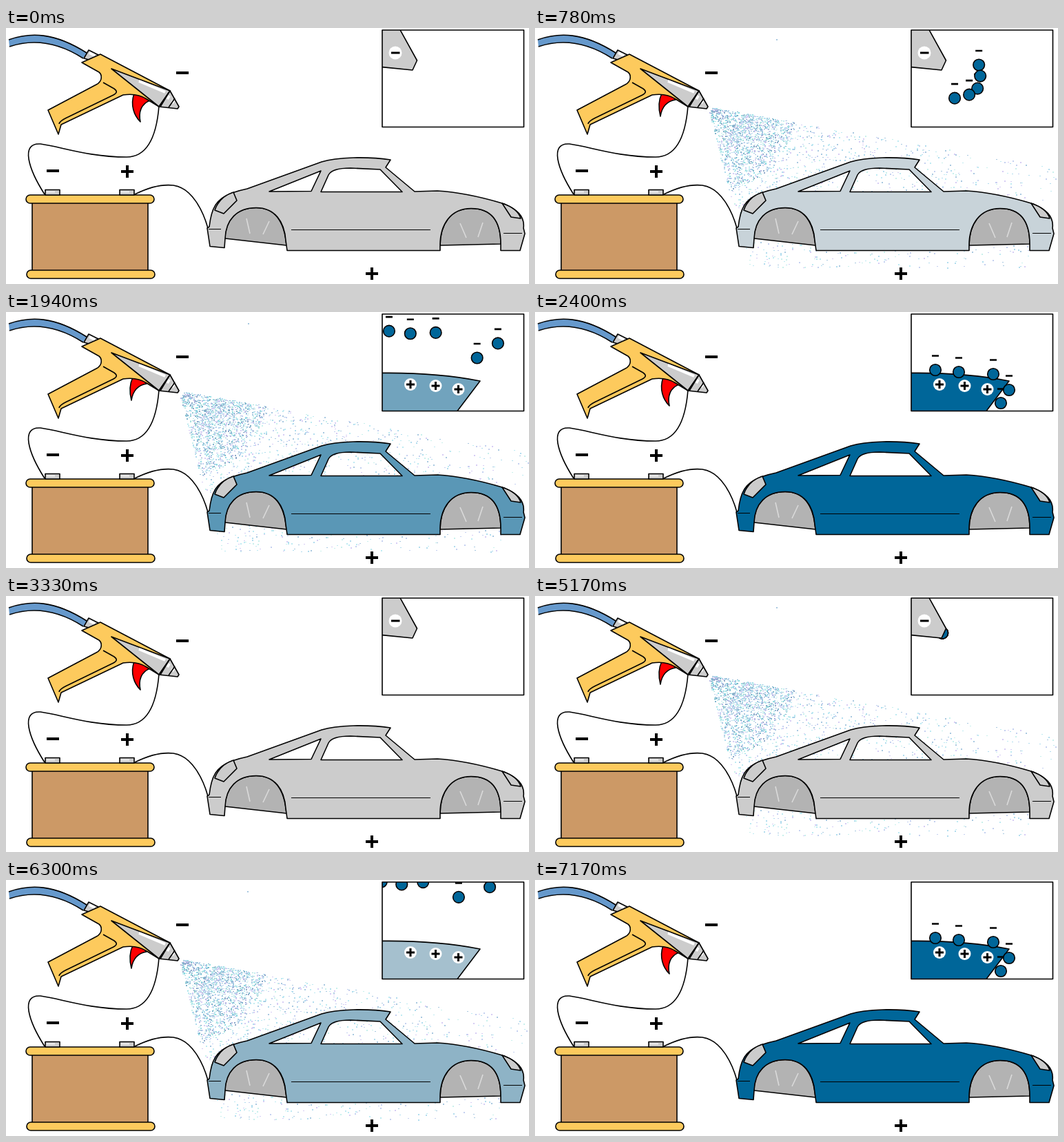
An HTML page with a canvas that plays this animation: 759 by 371 pixels, repeating every 8000 ms.

```html
<!DOCTYPE html>
<html lang="en">
<head>
<meta charset="utf-8">
<title>Electrostatic painting</title>
<style>
  html, body { margin: 0; width: 759px; height: 371px; overflow: hidden; background: #fff; }
  canvas, svg { position: absolute; left: 0; top: 0; }
  svg { stroke: #000; stroke-width: 1.6; stroke-linejoin: round; fill: none; }
  .gray { fill: #ccc; }
  .yellow { fill: #fdca5d; }
  .shine { stroke: #fff; stroke-width: 4; }
  .sign { stroke-width: 4; }
  .small { stroke-width: 3; }
  .spoke { stroke: #dadada; }
  .dot { fill: #fff; stroke: none; }
  .charge { stroke-width: 2.6; }
</style>
</head>
<body>
<canvas id="spray" width="759" height="371"></canvas>
<svg width="759" height="371" viewBox="0 0 759 371">
  <defs>
    <clipPath id="frame"><rect x="546" y="3" width="205.500" height="140.500"/></clipPath>
  </defs>

  <!-- wires -->
  <path d="M222 113C219 150 208 187 175 187C120 187 80 172 50 168C20 166 33 205 56 241"/>
  <path d="M187 241C205 232 225 226 243 228C270 232 286 265 293 290"/>

  <!-- spray gun -->
  <path d="M4 17C35 6 70 6 117 36L112 44C70 17 35 17 5 27Z" fill="#69c" stroke="none"/>
  <path d="M4 17C35 6 70 6 117 36M5 27C35 17 70 17 112 44"/>
  <path class="gray" d="M120 32L134 39L128 48L113 44Z"/>
  <path class="shine" d="M121 36L129 40"/>
  <path id="trigger" fill="#f00"/>
  <path class="yellow" d="M137 38L238 91L222 114L204 103C195 97 183 95 170 97L80 140L76 154L61 119L131 82C141 77 139 67 135 64L110 50Z"/>
  <path d="M141 79L157 88Q164 93 156 97L86 131Q78 135 77 139"/>
  <path class="gray" d="M153 59L238 91L222 114Z"/>
  <path class="shine" d="M193 77L231 93"/>
  <path class="gray" d="M238 91L251 114L249 117L222 114Z"/>
  <path class="shine" d="M237 98L234 103M243 105L241 109"/>
  <path d="M238 91L224 114M245 102L236 115"/>
  <path class="sign" d="M247 65h18"/>

  <!-- battery -->
  <rect x="38" y="253" width="168" height="99" fill="#c96"/>
  <rect class="yellow" x="29" y="242" width="186" height="12" rx="6"/>
  <rect class="yellow" x="30" y="351" width="186" height="12" rx="6"/>
  <rect class="gray" x="57" y="234.500" width="21" height="7.500"/>
  <rect class="gray" x="165" y="234.500" width="21" height="7.500"/>
  <path d="M59 237.500h12M167 237.500h12" stroke="#eee" stroke-width="2"/>
  <path class="sign" d="M59 207h18M167 208h18M176 199v18M522 356h18M531 347v18"/>

  <!-- car -->
  <path d="M318 305C318 278 335 260.500 363 260.500C390 260.500 404 280 407 315Z" fill="#b3b3b3"/>
  <path d="M630 315C630 285 645 261.500 675 261.500C705 261.500 718 280 718 313Z" fill="#b3b3b3"/>
  <path class="spoke" d="M349 276l5 22M382 280l-9 19M659 283l9 21M692 282l-7 21"/>
  <path id="car" fill-rule="evenodd" d="M292 290L295 288C298 262 304 248 328 239Q340 235 350 233L458 194C480 187 525 186 558 191L551 202L593 237L626 236C660 238 690 245 720 254C745 263 753 276 751 290L753 298L746 322.500H718V313C718 280 705 261.500 675 261.500C645 261.500 630 285 630 315V322.500H408L406 308C404 280 390 260.500 363 260.500C335 260.500 319 278 318 305L317 318.500L296 316.500Z
    M382 237L457 207L443 236.500ZM457 237.500L468 213Q473 203 500 203L543 205L575 237.500Z"/>
  <path class="gray" d="M330 238L335 250L316 269L303 264C307 252 315 243 330 238Z"/>
  <path class="gray" d="M720 254C735 259 744 266 747 276L733 274Z"/>
  <path d="M414 292.500H616M294 291.500H312M722 297.500H749" stroke-width="1.200"/>

  <!-- close-up -->
  <rect x="546" y="3" width="205.500" height="140.500" fill="#fff" stroke="none"/>
  <g clip-path="url(#frame)">
    <g id="panel">
      <path id="panelFill" d="M540 88.500C600 87.500 650 92.500 688 100L655 143.500V150H540Z"/>
    </g>
    <g id="drops"></g>
    <g id="nozzle">
      <path class="gray" d="M540 0H570.500L596.500 47L590 61L540 56Z"/>
      <circle class="dot" cx="565" cy="36" r="9.500"/>
      <path class="small" d="M559 36h12.500"/>
    </g>
  </g>
  <rect x="546" y="3" width="205.500" height="140.500"/>
</svg>
<script>
const LOOP = 8000, SWITCH = 810, STEP = 40;
const RUNS = [{ from: 500, to: 2400, hold: 3330 }, { from: 5170, to: 7170, hold: 8000 }];
const TIP = [591, 53.5];
const FAN = [[53, 0], [55, 16], [51, 34], [39, 43], [18, 48]];
// cubic paths onto the panel: straight on top, curling round the edge
const LAND = [
  line([541, -6], [581, 84]),
  line([570, -2], [615, 87]),
  line([599, -6], [665, 90]),
  [[648, 11], [678, 59], [728, 118], [676, 132]],
  [[697, 2], [715, 26], [733, 105], [688, 113]]
];
const TRIGGER = {
  rest: 'M186 95C180 112 186 127 195 136C192 122 196 110 209 105L200 97Z',
  pulled: 'M184 95C178 107 180 120 182 128C184 114 192 106 204 104L196 96Z'
};
const INNER = ['#7fb4cc', '#9fc4dc', '#8fdce4', '#b8b8e4', '#a8e0dc', '#b4d4ee', '#8ca8c8', '#c4ecf0'];
const OUTER = ['#bdeaf2', '#d6ccf4', '#b0dcee', '#a8c8e0', '#c8f0ec', '#c4d0f0'];
const METAL = [204, 204, 204], TINT = [204, 213, 218], BLUE = [0, 102, 153];

const $ = id => document.getElementById(id);
const ctx = $('spray').getContext('2d');

function line(a, b) {
  const at = k => a.map((v, i) => v + (b[i] - v) * k);
  return [a, at(1 / 3), at(2 / 3), b];
}

function bezier(p, k) {
  const j = 1 - k;
  return [0, 1].map(i =>
    j * j * j * p[0][i] + 3 * j * j * k * p[1][i] + 3 * j * k * k * p[2][i] + k * k * k * p[3][i]);
}

function add(parent, tag, attrs) {
  const el = document.createElementNS('http://www.w3.org/2000/svg', tag);
  for (const name in attrs) el.setAttribute(name, attrs[name]);
  return parent.appendChild(el);
}

function random(seed) {
  return () => {
    seed = (seed * 1664525 + 1013904223) >>> 0;
    return seed / 4294967296;
  };
}

for (const [x, y] of [[587, 105], [623.5, 107], [656.5, 112]]) {
  add($('panel'), 'circle', { class: 'dot', cx: x, cy: y, r: 9 });
  add($('panel'), 'path', { class: 'small', d: `M${x - 6} ${y}h12M${x} ${y - 6}v12` });
}

// all minus signs lie below all droplets
const signs = FAN.map(() => add($('drops'), 'path', { class: 'charge', d: 'M-5 -20.5h10' }));
const balls = FAN.map(() => add($('drops'), 'circle', { r: 8.3, fill: '#069' }));

function mist(rnd, count, near, span, power, colors, shift) {
  for (let i = 0; i < count; i++) {
    const r = near + span * rnd() ** power + shift;
    const a = (10 + 66 * rnd() ** 1.1) * Math.PI / 180;
    const x = 251 + r * Math.cos(a), y = 114 + r * Math.sin(a);
    ctx.fillStyle = colors[Math.floor(rnd() * colors.length)];
    const h = rnd() < 0.5 ? 1 : 2;
    if (y < 347) ctx.fillRect(Math.round(x), Math.round(y), 2, h);
  }
}

let shown;
function drawSpray(phase) {
  if (phase === shown) return;
  shown = phase;
  ctx.clearRect(0, 0, 759, 371);
  if (phase < 0) return;
  const rnd = random(7);
  mist(rnd, 1000, 6, 120, 0.8, INNER, phase * 1.6);
  mist(rnd, 2300, 50, 465, 1.25, OUTER, phase * 1.6);
  ctx.fillRect(350 + phase, 16, 2, 2);
}

function paint(base, k) {
  return `rgb(${base.map((v, i) => Math.round(v + (BLUE[i] - v) * k))})`;
}

function render(t) {
  const run = RUNS.find(r => t >= r.from && t < r.hold);
  const u = run ? Math.min(t, run.to) - run.from : 0;
  const length = run ? run.to - run.from : 1;
  const spraying = !!run && t < run.to;
  const close = u >= SWITCH;
  const base = u < STEP ? METAL : TINT;

  drawSpray(spraying ? Math.floor(u / STEP) % 7 : -1);
  $('trigger').setAttribute('d', spraying ? TRIGGER.pulled : TRIGGER.rest);
  $('car').setAttribute('fill', paint(base, (u / length) ** 2.1));
  $('panelFill').setAttribute('fill', paint(base, (u / length) ** 2.9));
  $('panel').style.display = close ? '' : 'none';
  $('nozzle').style.display = close ? 'none' : '';
  $('drops').style.display = run ? '' : 'none';

  const e = close ? ((u - SWITCH) / (length - SWITCH)) ** 1.8 : 0;
  balls.forEach((ball, i) => {
    const [x, y] = close ? bezier(LAND[i], e) : TIP.map((v, j) => v + FAN[i][j] * u / 280);
    const move = `translate(${x.toFixed(2)} ${y.toFixed(2)})`;
    ball.setAttribute('transform', move);
    signs[i].setAttribute('transform', move);
    signs[i].style.display = close || u > 120 ? '' : 'none';
  });
}

const start = performance.now();
function tick() {
  render((performance.now() - start) % LOOP);
  requestAnimationFrame(tick);
}
tick();
</script>
</body>
</html>
```
